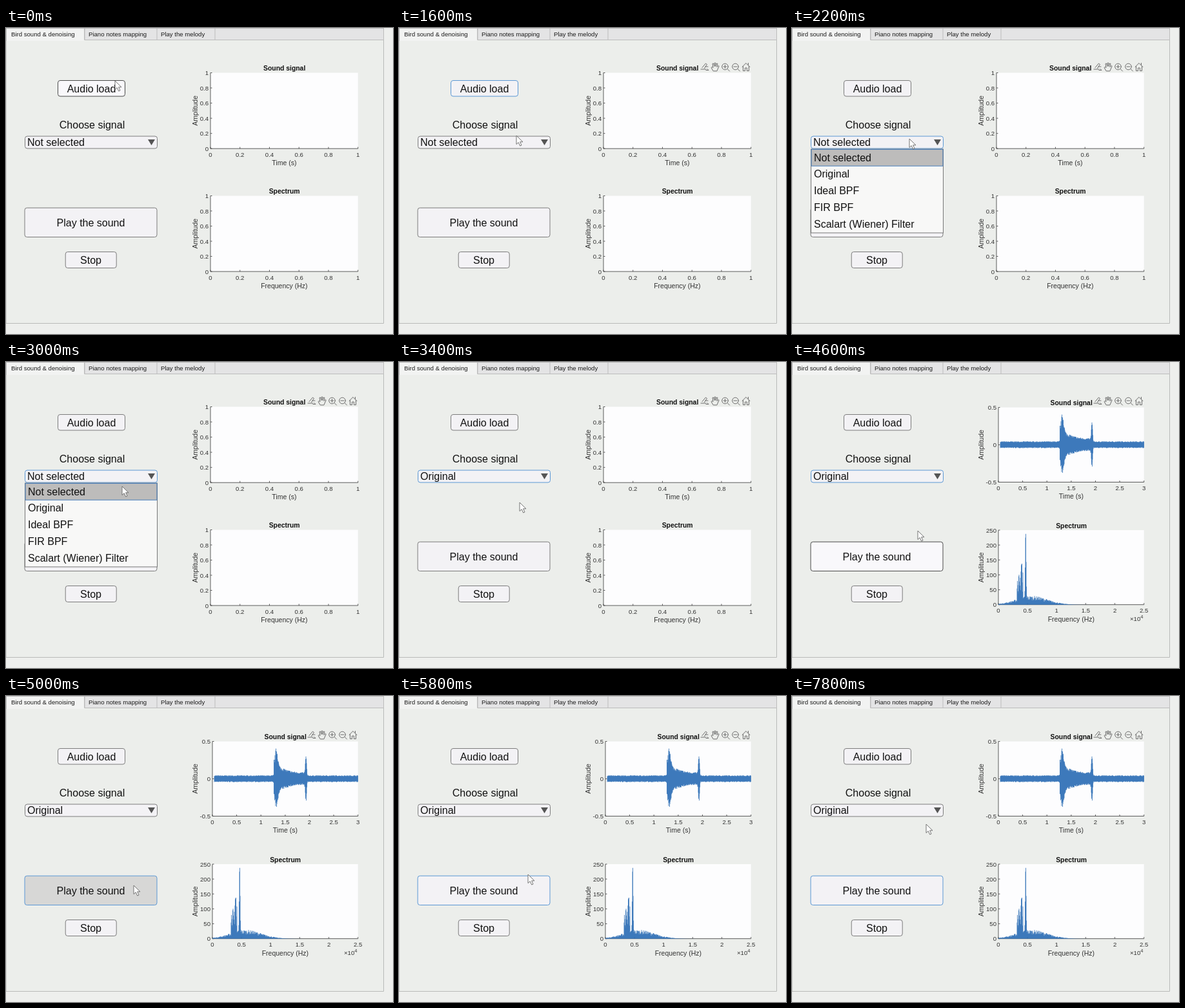
Animation of 600 by 475 pixels, one loop 8000 ms. Source, as an HTML page:

```html
<!DOCTYPE html>
<html lang="en">
<head>
<meta charset="utf-8">
<title>Bird sound &amp; denoising</title>
<style>
html, body { margin: 0; width: 100%; height: 100%; overflow: hidden; background: #eeefed; }
svg { display: block; width: 600px; height: 475px; font-family: "Liberation Sans", Arial, sans-serif; }
.ui { font-size: 16px; fill: #111; }
.tab { font-size: 9.6px; fill: #1c1c1c; }
.tick { font-size: 9.6px; fill: #333; }
.label { font-size: 10.5px; fill: #333; }
.title { font-size: 10.4px; font-weight: bold; fill: #111; }
.mid { text-anchor: middle; }
.end { text-anchor: end; }
.button { fill: #f3f2f5; stroke: #7c7c7c; }
.button.hover { fill: #f9f8fb; stroke: #4b4b4b; }
.button.pressed { fill: #d7d7d6; }
.button.focus { stroke: #5b97d4; }
.axis { fill: none; stroke: #4a4a4a; stroke-width: .9; }
.data { fill: none; stroke: #2f6fb5; stroke-width: .8; }
.icon { fill: none; stroke: #6c6c6c; stroke-linecap: round; stroke-linejoin: round; }
</style>
</head>
<body>
<svg viewBox="0 0 600 475">
  <rect width="600" height="475" fill="#eeefed"/>
  <path d="M0 0H585.5V458.5H0Z" fill="#eceeeb" stroke="#b9bab9"/>
  <path d="M0 .5H585.5V18.5H0Z" fill="#e4e4e5" stroke="#bcbcbc"/>
  <path d="M122 0V18M234 0V18M324 0V18" stroke="#bcbcbc"/>
  <path d="M.5 20V.5H121.5V20" fill="#f2f3f2"/>
  <path d="M.5 20V.5H121.5V18.5" fill="none" stroke="#bcbcbc"/>
  <g class="tab">
    <text x="8" y="13">Bird sound &amp; denoising</text>
    <text x="128" y="13">Piano notes mapping</text>
    <text x="240" y="13">Play the melody</text>
  </g>

  <g id="empty"></g>
  <g id="loaded"></g>
  <g id="toolbar" class="icon" transform="translate(0 -.5)">
    <path d="M468 64.5h8M470 62l5.500-6.500 2 1.500-4 6M475 60.500h4M476 66h4l-2-2"/>
    <path d="M487 67l-3-5q1-2 3 0l-1-6q1-1 2 0l1 4v-5q1-1 2 0v5l1-4q1-1 2 0l-1 5 2-2q1 0 1 1l-3 7Z"/>
    <path d="M509 64l3.500 3.500M503 60.500h5M505.500 58v5"/><circle cx="505.500" cy="60.500" r="4.800"/>
    <path d="M525 64l3.500 3.500M519 60.500h5"/><circle cx="521.500" cy="60.500" r="4.800"/>
    <path d="M532 61l6-6 6 6M533.500 60v7h3v-4.500h3V67h3v-7M541.500 58v-3"/>
  </g>

  <rect id="load" class="button" x="80.500" y="81.500" width="104" height="24.500" rx="3.500"/>
  <rect id="select" class="button" x="29.500" y="168" width="205" height="19" rx="3.500"/>
  <path d="M220 173h11l-5.500 9Z" fill="#555"/>
  <rect id="play" class="button" x="29" y="279.200" width="205" height="45.300" rx="3.500"/>
  <rect class="button" x="92.200" y="347.500" width="79" height="25" rx="3.500"/>
  <g class="ui">
    <text class="mid" x="132.500" y="99.800">Audio load</text>
    <text class="mid" x="133.500" y="155.500">Choose signal</text>
    <text id="value" x="33" y="183.200"></text>
    <text class="mid" x="131.500" y="307.500">Play the sound</text>
    <text class="mid" x="131.500" y="366">Stop</text>
  </g>
  <g id="list">
    <rect x="29.500" y="188" width="205" height="130" fill="#f8f8f7" stroke="#777"/>
    <rect id="highlight" x="30" width="204" height="25.700" fill="#bdbcbb" stroke="#4a80bd"/>
    <g id="items" class="ui"></g>
  </g>
  <path id="cursor" d="M0 0V13.500L3.200 10.600 5.700 16 8 15 5.600 9.800H10Z" fill="#fff" stroke="#666" stroke-width=".9" stroke-linejoin="round"/>
</svg>
<script>
const $ = id => document.getElementById(id);
const LOOP = 8000, STEP = 200;
const OPTIONS = ["Not selected", "Original", "Ideal BPF", "FIR BPF", "Scalart (Wiener) Filter"];
const ROW = 25.8;
const RIGHT = 545.7;

let seed = 7;
const random = (min, max) => {
  seed = seed * 16807 % 2147483647;
  return min + (max - min) * seed / 2147483647;
};
const bell = (x, center, width) => Math.exp(-(((x - center) / width) ** 2));
const text = (cls, x, y, str, extra = "") => `<text class="${cls}" x="${x}" y="${y}" ${extra}>${str}</text>`;

// Each scale is [first value, increment, number of intervals].
function chart(title, xLabel, left, top, bottom, xScale, yScale) {
  const mid = (left + RIGHT) / 2, midY = (top + bottom) / 2;
  let ticks = "", labels = "";
  const eachTick = ([first, step, count], draw) => {
    for (let i = 0; i <= count; i++) draw(i / count, +(first + i * step).toFixed(1));
  };
  eachTick(xScale, (part, value) => {
    const x = left + (RIGHT - left) * part;
    ticks += `M${x} ${bottom}v-2.500`;
    labels += text("tick mid", x, bottom + 12.7, value);
  });
  eachTick(yScale, (part, value) => {
    const y = bottom + (top - bottom) * part;
    ticks += `M${left} ${y}h2.500`;
    labels += text("tick end", left - 3, y + 3.5, value);
  });
  return `<path d="M${left} ${top}H${RIGHT}V${bottom}H${left}Z" fill="#fdfdfe"/>
    <path class="axis" d="M${left} ${top}V${bottom}H${RIGHT}${ticks}"/>` + labels +
    text("title mid", mid + .3, top - 3.4, title) + text("label mid", mid, bottom + 25.8, xLabel) +
    text("label mid", 0, 0, "Amplitude", `transform="translate(296.5 ${midY}) rotate(-90)"`);
}

// Dense vertical strokes whose ends come from span(x).
function strokes(from, span) {
  let d = "";
  for (let x = from; x < RIGHT; x += .5) {
    const [y0, y1] = span(x);
    d += `M${x} ${y0}V${y1}`;
  }
  return `<path class="data" d="${d}"/>`;
}

// Steady noise, a chirp with a decaying tail, and a short closing burst.
const soundStrokes = () => strokes(323, x => {
  const tail = x > 415 && x < 467 ? 3.5 + 19 * Math.exp((415 - x) / 15) : 0;
  const height = 5 + tail + 25 * bell(x, 419.5, 2.6) + 27 * bell(x, 465, 1.3);
  return [128.4 - height * random(.75, 1.05), 128.4 + height * random(.75, 1.05)];
});

// A broad low hump, a ragged band and two narrow peaks.
const spectrumStrokes = () => strokes(320, x => {
  const hump = 11 * bell(x, 372, 34) * random(.6, 1.25);
  const band = Math.abs(x - 353.5) < 4.8 ? random(10, 44) : 0;
  const peaks = 30 * bell(x, 356, .8) + 104 * bell(x, 362.3, .9);
  return [376.7, 376.7 - hump - band - peaks];
});

const SOUND = ["Sound signal", "Time (s)"], SPECTRUM = ["Spectrum", "Frequency (Hz)"];
const UNIT = [0, .2, 5];
$("empty").innerHTML =
  chart(...SOUND, 317, 69.5, 187.2, UNIT, UNIT) +
  chart(...SPECTRUM, 317, 260.5, 378, UNIT, UNIT);
$("loaded").innerHTML =
  chart(...SOUND, 320, 70.5, 186.5, [0, .5, 6], [-.5, .5, 2]) + soundStrokes() +
  chart(...SPECTRUM, 320, 261, 376.7, [0, .5, 5], [0, 50, 5]) + spectrumStrokes() +
  text("tick", 524, 402, '×10<tspan font-size="7.500" dy="-4">4</tspan>');
$("items").innerHTML = OPTIONS.map((name, i) => text("", 34, 206.6 + ROW * i, name)).join("");

// Pointer stops: time, x, y.
const STOPS = [[0, 169, 82], [200, 165, 83], [1400, 165, 98], [1600, 182, 167], [2000, 182, 167],
  [3000, 180, 193], [3200, 182, 221], [3600, 191, 214], [4000, 191, 214], [5000, 198, 294],
  [5800, 200, 277], [7800, 208, 199]];

function pointerAt(t) {
  const next = STOPS.findIndex(stop => stop[0] > t);
  if (next < 0) return STOPS.at(-1).slice(1);
  const [t0, x0, y0] = STOPS[next - 1], [t1, x1, y1] = STOPS[next];
  const part = (t - t0) / (t1 - t0);
  return [x0 + (x1 - x0) * part, y0 + (y1 - y0) * part].map(Math.round);
}

function render(t) {
  const during = (from, to) => t >= from && t < to;
  const show = (id, on) => $(id).setAttribute("visibility", on ? "visible" : "hidden");
  const style = (id, flags) => {
    for (const name in flags) $(id).classList.toggle(name, flags[name]);
  };
  show("empty", t < 3600);
  show("loaded", t >= 3600);
  show("toolbar", t >= 200);
  show("list", during(2200, 3400));
  style("load", { hover: t < 1600, focus: during(400, 2200) });
  style("select", { focus: during(2200, 5000) });
  style("play", { hover: during(4600, 5800), pressed: during(5000, 5200), focus: t >= 5000 });
  $("value").textContent = OPTIONS[t < 3400 ? 0 : 1];
  $("highlight").setAttribute("y", 188.5 + (t < 3200 ? 0 : ROW));
  $("cursor").setAttribute("transform", `translate(${pointerAt(t)})`);
}

const start = performance.now();
function tick() {
  const t = (performance.now() - start) % LOOP;
  render(Math.floor(t / STEP) * STEP);
  requestAnimationFrame(tick);
}
tick();
</script>
</body>
</html>
```
